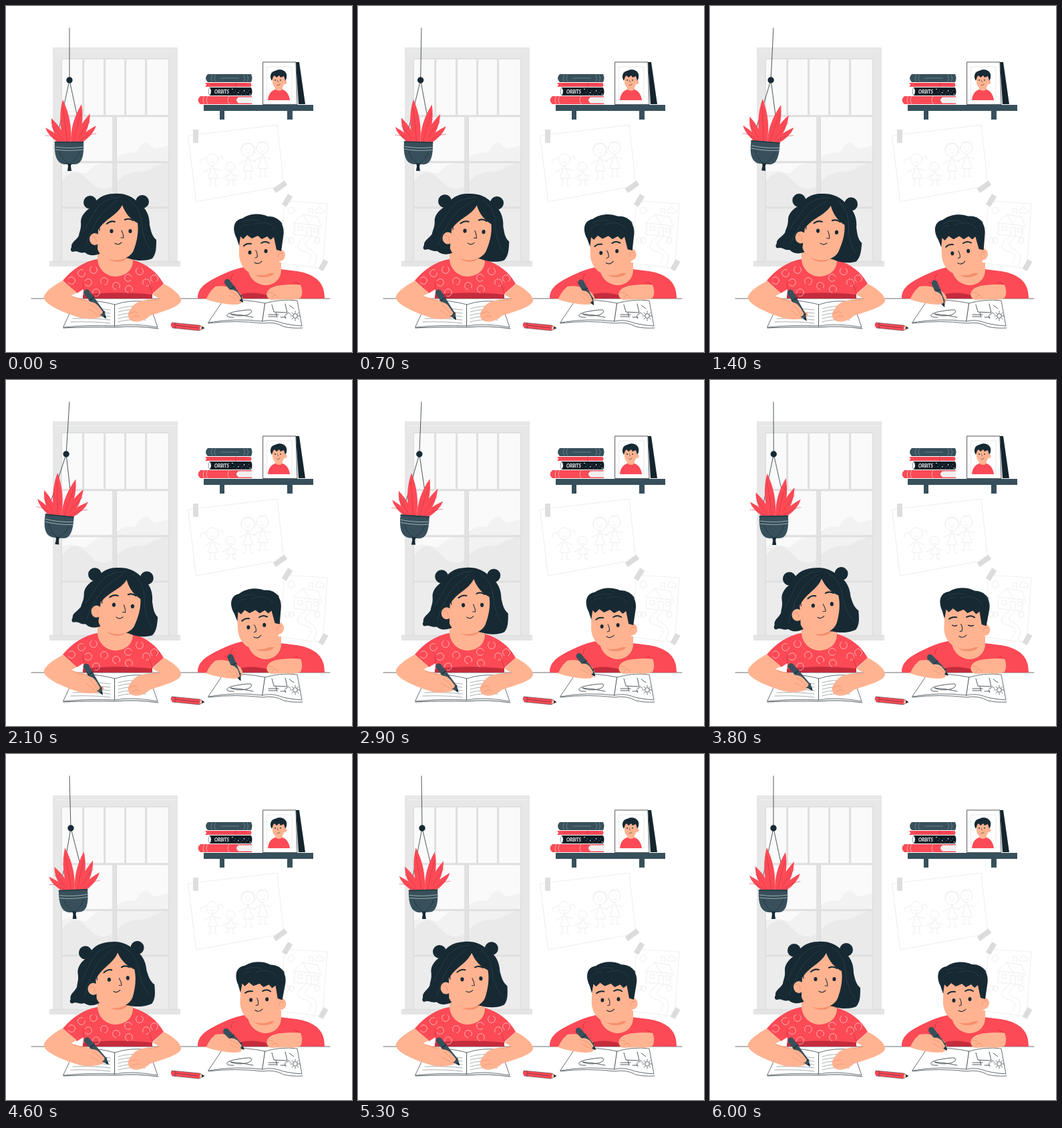
These frames come from a looping animation (518x518 px, 6100 ms). An HTML page with a canvas:

```html
<!DOCTYPE html>
<html lang="en">
<head>
<meta charset="utf-8">
<title>Children drawing</title>
<style>
html, body { margin: 0; width: 100%; height: 100%; overflow: hidden; background: #fff; }
canvas { display: block; width: 518px; height: 518px; }
</style>
</head>
<body>
<canvas id="stage"></canvas>
<script>
const SIZE = 518, LOOP = 6100, STEP = 100;
const RED = '#fc4a56', DEEP = '#c42c3d', SKIN = '#ffb391', SHADE = '#f58f6c';
const TEAL = '#37505b', DARK = '#172a34', INK = '#263238';
const canvas = document.getElementById('stage');
const ratio = window.devicePixelRatio || 1;
canvas.width = canvas.height = SIZE * ratio;
const ctx = canvas.getContext('2d');

function fill(d, color) {
  ctx.fillStyle = color;
  ctx.fill(new Path2D(d));
}

function line(d, color = INK, width = 0.8) {
  ctx.strokeStyle = color;
  ctx.lineWidth = width;
  ctx.stroke(new Path2D(d));
}

function shape(d, color, edge, width) {
  fill(d, color);
  line(d, edge, width);
}

function rect(x, y, w, h, color) {
  ctx.fillStyle = color;
  ctx.fillRect(x, y, w, h);
}

function oval(x, y, rx, ry, color) {
  ctx.beginPath();
  ctx.ellipse(x, y, rx, ry, 0, 0, Math.PI * 2);
  ctx.fillStyle = color;
  ctx.fill();
}

function ring(x, y, r, color, width = 0.8, from = 0, to = Math.PI * 2) {
  ctx.beginPath();
  ctx.arc(x, y, r, from, to);
  ctx.strokeStyle = color;
  ctx.lineWidth = width;
  ctx.stroke();
}

function turned(x, y, degrees, draw, dy = 0) {
  ctx.save();
  ctx.translate(x, y + dy);
  ctx.rotate(degrees * Math.PI / 180);
  ctx.translate(-x, -y);
  draw();
  ctx.restore();
}

// Cosine easing between [time, value] keys.
function track(keys, t) {
  let i = 1;
  while (i < keys.length - 1 && t > keys[i][0]) i++;
  const [t0, a] = keys[i - 1], [t1, b] = keys[i];
  const p = Math.min(1, Math.max(0, (t - t0) / (t1 - t0)));
  return a + (b - a) * (1 - Math.cos(Math.PI * p)) / 2;
}

const SWING = [[0, 0], [2000, 5], [4700, -2.1], [5900, 0], [6100, 0]];
const LEAN = [[0, 0], [1300, 1], [2000, 0.98], [3700, -1], [4700, -1], [6000, 0], [6100, 0]];

function drawWindow() {
  rect(70, 62, 187, 321, '#e7e7e7');
  rect(74, 68, 179, 1, '#efefef');
  rect(82, 78, 163, 304, '#e0e0e0');
  rect(84, 80, 159, 302, '#fafafa');
  fill('M84 249C94 246 104 246 114 250S128 238 140 236S154 232 166 226S178 219 188 220S198 207 207 205S216 215 228 213L243 208V302H84Z', '#f2f2f2');
  fill('M84 262C92 252 101 246 110 250S128 269 138 272S158 273 166 263S188 248 202 248S222 237 243 234V302H84Z', '#eaeaea');
  rect(84, 302, 159, 80, '#ececec');
  for (const x of [114, 146, 177, 208]) {
    rect(x, 80, 3, 84, '#e2e2e2');
    rect(x + 2.3, 80, 0.8, 84, '#d9d9d9');
  }
  rect(159, 166, 7, 136, '#e2e2e2');
  rect(165, 166, 1, 136, '#d9d9d9');
  for (const y of [163, 232, 300]) {
    rect(83, y, 161, 3, '#e2e2e2');
    rect(83, y + 2.4, 161, 0.8, '#dadada');
  }
  rect(65, 382, 196, 8, '#e4e4e4');
  rect(65, 382, 196, 1, '#dadada');
}

function drawPapers() {
  const faint = '#eaeaea';
  shape('M273 194L406 178L416 269L285 293Z', '#fff', '#e9e9e9');
  for (const [x, y, r, h] of [[309, 230, 9, 39], [336, 241, 7, 27], [362, 216, 10, 43], [384, 213, 9, 42]]) {
    ring(x, y, r, faint);
    oval(x - 3, y - 1, 0.7, 0.7, faint);
    oval(x + 3, y - 1, 0.7, 0.7, faint);
    ring(x, y + 2, 3, faint, 0.7, 0.2, 2.9);
    const neck = y + r, hip = y + h * 0.72, foot = y + h;
    line(`M${x} ${neck}L${x - 7} ${hip}H${x + 8}ZM${x - 3} ${hip}V${foot}h-4M${x + 4} ${hip}V${foot}h4M${x - 2} ${neck + 4}L${x - 13} ${neck + 10}M${x + 2} ${neck + 4}L${x + 12} ${neck + 7}`, faint);
  }
  line('M300 228q-12 0-9 8M318 227q6-6 7 3M352 216q1-15 15-10q9 5 5 15M378 206l3-4 3 3 4-3 4 5', faint);
  rect(280, 185, 8, 20, '#dedede');
  turned(410, 271, -36, () => rect(400, 267, 21, 8, '#dcdcdc'));

  shape('M417 292L481 296L474 393L411 385Z', '#fff', '#ebebeb');
  line('M429 326l15-14 23 4 6 17M433 325l-2 17 36 4 2-17M433 325l36 4M444 312l11 17M450 343v-12l7 1v13M438 330h6v6h-6ZM461 332h5v6h-5ZM454 311v-8h5v9', faint);
  line('M448 346C432 356 434 364 446 367S460 377 450 388M457 346C446 356 445 360 455 364S468 379 460 390', faint);
  ring(427, 306, 5, faint);
  for (const x of [421, 427, 466]) ring(x, 351, 4, faint);
  line('M466 304q3-6 6 0q6 1 4 6h-12q-3-5 2-6', faint);
  turned(421, 291, -58, () => rect(412, 287, 18, 8, '#dcdcdc'));
  turned(475, 388, -60, () => rect(467, 384, 16, 8, '#dcdcdc'));
}

function drawShelf() {
  rect(320, 156, 7, 14, TEAL);
  rect(421, 156, 8, 14, TEAL);
  rect(296, 148, 164, 9, TEAL);

  fill('M302 102H367Q370 108 367 114H302Q296 108 302 102Z', TEAL);
  line('M309 103q-4 5 0 10M314 103q-4 5 0 10M356 103q3 5 0 10M361 103q3 5 0 10M322 108H348', '#7d949c', 0.7);
  fill('M298 115H366Q369 118 366 121H298Q302 118 298 115Z', RED);
  line('M306 117H360M344 115v6', DEEP, 0.7);
  fill('M305 122H367Q370 128 367 134H305Q309 128 305 122Z', '#101c25');
  line('M305 122Q301 128 305 134', '#8d999d', 1);
  for (let i = 0; i < 13; i++) {
    const r = i % 4 ? 0.45 : 0.8;
    oval(339 + i * 2.2, 124.5 + (i * 5.3) % 8, r, r, '#fff');
  }
  ctx.fillStyle = '#fff';
  ctx.font = 'italic 700 6.6px Lato, sans-serif';
  ctx.fillText('ORBITS', 312, 130.6);
  fill('M291 135H368V147H291Q284 141 291 135Z', RED);
  fill('M348 136.5H369V145.5H348Q342 141 348 136.5Z', '#f3f3f3');
  line('M349 139H367M349 142H367', '#dedede', 0.6);
  line('M297 135q-4 6 0 12M302 135q-4 6 0 12M334 135q-4 6 0 12', '#ffb9b9', 0.8);

  fill('M434 84L439 84L448 147H438Z', '#14242d');
  shape('M385 84H434L436 147.5H385Z', '#fff', INK, 0.8);
  line('M391 91H428V141H391Z', '#e0e0e0', 0.7);
  fill('M392 141C393 130 398 127 403 125H414C420 127 424 133 425 141Z', RED);
  fill('M403 119H414V125Q409 129 403 125Z', SKIN);
  fill('M399 103H417V116Q415 123 408 124Q400 123 399 115Z', SKIN);
  oval(418, 114, 2.3, 3, SKIN);
  fill('M398 112C394 106 396 98 403 97C410 93 418 96 420 102Q421 108 418 112L416 105L411 107L409 104L405 107L402 104L400 106Z', DARK);
  oval(403, 111, 0.9, 1.1, INK);
  oval(411, 111, 0.9, 1.1, INK);
  line('M406.5 111l1 3M406 118q3 2 4-1', INK, 0.6);
}

function leaf(x, y, width) {
  const bx = 95 + (x - 95) * 0.34, mx = (bx + x) / 2, my = (204 + y) / 2;
  fill(`M${bx - 4} 205Q${mx - width} ${my} ${x} ${y}Q${mx + width} ${my} ${bx + 5} 205Z`, RED);
  line(`M${bx} 204Q${mx} ${my} ${x} ${y + 12}`, DEEP, 0.5);
}

function drawPot() {
  line('M95 111L75 204M95 111L115 204', INK, 0.8);
  oval(95, 111, 4.7, 4.7, DARK);
  for (const [x, y, w] of [[68, 168, 10], [126, 161, 10], [59, 182, 9], [135, 179, 10], [113, 147, 11], [85, 140, 12]]) leaf(x, y, w);
  fill('M73 203H116Q118 237 103 237H87Q71 235 73 203Z', TEAL);
  line('M73 204H116', DARK, 0.9);
  line('M74 211Q95 214 116 211M74 215Q95 218 116 215', '#c6d2d5', 0.7);
  line('M80 218Q84 230 95 237Q106 230 110 218', DARK, 0.6);
  fill('M92 236H98L97 240L98 247H92L93 240Z', DARK);
}

// The pot swings a little further than the cord that holds it.
function drawPlant(angle) {
  turned(95, 33, angle * 0.72, () => {
    line('M95 33V108', INK, 0.8);
    turned(95, 111, angle * 0.45, drawPot);
  });
}

function pen(tipX, tipY, angle, length) {
  ctx.save();
  ctx.translate(tipX, tipY);
  ctx.rotate(angle);
  fill(`M0 0L-9 -4H${5 - length}Q${-length - 2} 0 ${5 - length} 5L-9 4Z`, TEAL);
  line(`M-10 -4.5V4.5M${18 - length} -4.5V4.5`, DARK, 1);
  fill('M0 0L-5 -2.2V2.2Z', DARK);
  ctx.restore();
}

function drawGirlBook() {
  shape('M105 440Q138 440 163 447V479Q126 477 86 481Z', '#fff', INK, 0.7);
  shape('M163 447Q186 439 214 443L227 481Q188 474 163 479Z', '#fff', INK, 0.7);
  line('M86 482Q130 480 163 481Q194 478 228 483', INK, 0.8);
  for (let i = 0; i < 5; i++) {
    const y = 453 + i * 5;
    line(`M${109 - i * 3} ${y}Q134 ${y - 1} 156 ${y + 2}M168 ${y}Q184 ${y - 5} ${205 + i} ${y - 3}`, '#6d777c', 0.6);
  }
}

function drawGirlBody() {
  fill('M136 379C116 383 99 394 85 411L106 430L116 424L115 438H219V431L236 416C226 398 212 387 190 380Z', RED);
  fill('M115 433Q160 426 219 432V438H115Z', DEEP);
  fill('M137 360H190V381C190 396 178 405 163 405C148 404 138 393 137 379Z', SKIN);
  fill('M150 376H182Q178 383 166 383Q156 382 150 376Z', SHADE);
  for (const [x, y] of [[113, 400], [131, 395], [147, 412], [123, 414], [183, 407], [200, 397], [210, 414], [184, 424], [135, 429], [165, 419], [98, 411], [222, 408]]) {
    ring(x, y, 5.4, '#ffc0be', 0.9, x, x + 5.2);
  }
  line('M116 424L115 412M219 431L214 414', DEEP, 0.7);
}

function drawGirlArms(lean) {
  fill('M236 416C251 423 263 434 262 442C258 452 231 458 215 464C206 473 190 476 184 468Q180 461 187 453C192 445 201 440 211 440L230 438L219 432Z', SKIN);
  line('M185 461Q191 456 197 459M188 467Q194 462 200 465M211 440Q222 441 230 438', SHADE, 0.8);
  turned(57, 437, lean * 0.8, () => {
    fill('M85 411C67 421 55 431 57 438C60 448 88 460 112 467C128 470 144 467 147 462Q148 458 142 456L131 444Q124 439 116 439L97 434L106 429Z', SKIN);
    line('M97 434Q108 439 118 441', SHADE, 0.8);
  });
  turned(118, 424, lean > 0 ? lean * 7 : lean * 5, () => {
    pen(150, 468, Math.atan2(44, 32), 55);
    fill('M122 443Q132 441 139 450L145 458Q143 464 137 462L124 456Z', SKIN);
    line('M127 447Q134 450 140 459M124 454Q131 458 137 462', SHADE, 0.8);
  });
}

function drawGirlHead() {
  oval(126, 294, 10, 10, DARK);
  oval(204, 293, 10, 10, DARK);
  fill('M162 281C145 281 134 289 129 301C120 305 112 314 112 323C113 334 110 337 109 344C105 351 97 354 98 361Q95 367 100 368C107 365 110 371 118 369C126 376 136 373 142 370L184 378C199 383 212 381 219 378C225 371 225 362 225 350C218 344 217 336 215 328C215 314 210 303 200 296C188 284 177 280 162 281Z', DARK);
  fill('M174 298C166 314 150 317 138 335L137 364C144 385 182 386 191 366C196 353 199 338 197 325C186 319 179 311 174 298Z', SKIN);
  oval(133, 349, 8, 9, SKIN);
  line('M129 345Q136 345 135 353', SHADE, 0.9);
  line('M172 286Q144 288 134 306T116 337M168 291Q147 304 137 320T119 360M183 289Q202 302 203 325T217 366', '#33474f', 0.6);
  line('M174 296Q161 314 150 318T140 336', DARK, 1.2);
  line('M151 326Q157 321 163 323M178 320Q184 317 190 321', DARK, 2.1);
  oval(158, 337, 2.6, 3.1, DARK);
  oval(186, 337, 2.6, 3.1, DARK);
  line('M173 336Q176 342 176 347L172 347M163 355Q168 359 173 354', INK, 1.1);
}

function drawBoyBook() {
  shape('M326 440Q360 439 388 445L384 472Q344 467 303 474Z', '#fff', INK, 0.7);
  shape('M388 445Q412 438 436 441L443 479Q418 477 409 473Q396 469 384 472Z', '#fff', INK, 0.7);
  line('M303 475Q344 470 384 475Q402 472 416 480Q428 483 444 482', INK, 0.7);
  line('M341 466C326 467 327 460 346 457S370 454 367 459S345 466 336 461Q352 462 370 466', INK, 0.8);
  line('M398 447l3 11 20 1-3-13M404 459l2 7M393 462h15M393 465h12M411 466h8M424 448l7 5', INK, 0.8);
  ring(433, 464, 3.4, INK, 0.8);
  for (let i = 0; i < 8; i++) {
    const c = Math.cos(i * Math.PI / 4), s = Math.sin(i * Math.PI / 4);
    line(`M${433 + c * 5} ${464 + s * 5}L${433 + c * 7} ${464 + s * 7}`, INK, 0.7);
  }
  line('M419 468q-4-6 2-7q2-4 5 1', INK, 0.7);
}

function drawBoyBody() {
  fill('M356 391C338 394 306 409 295 419Q286 428 287 438H477C477 422 472 411 456 403C444 397 428 396 411 394Z', RED);
  fill('M342 434Q368 425 394 434V438H342Z', DEEP);
  line('M327 413Q338 418 347 430M431 413Q444 417 449 428M340 401Q336 405 337 410', DEEP, 0.8);
  fill('M362 384H412V396C411 410 401 418 387 418C373 416 364 407 362 394Z', SKIN);
  fill('M370 400H402Q397 406 385 406Q376 406 370 400Z', SHADE);
}

function drawBoyArms(lean) {
  fill('M447 418C426 416 402 417 394 424C387 431 391 439 398 440L416 439Q438 442 447 433Z', SKIN);
  fill('M440 415Q456 418 461 425L460 438H441Q446 427 440 415Z', RED);
  line('M393 429Q399 427 402 433M398 436Q405 429 408 438', SHADE, 0.8);
  fill('M302 423C317 417 333 418 345 426C356 432 357 443 350 446C338 449 313 444 296 438Z', SKIN);
  fill('M309 410L318 417Q306 424 300 438H287Q287 423 309 410Z', RED);
  turned(346, 430, lean > 0 ? lean * 15 : lean * 7, () => {
    pen(355, 444, Math.atan2(36, 27), 45);
    fill('M332 425Q341 423 347 429L352 437Q350 443 344 440L333 433Z', SKIN);
    line('M336 428Q344 430 349 438M334 433Q340 437 345 440', SHADE, 0.8);
  }, Math.max(0, lean) * 5);
}

function drawBoyHead(blink) {
  fill('M349 339H411V374C410 393 397 402 384 403C363 404 351 392 349 374Z', SKIN);
  oval(410, 373, 8, 9, SKIN);
  line('M407 376Q408 368 414 370', SHADE, 0.9);
  fill('M345 347C338 333 341 320 354 318C365 310 382 310 392 315C408 314 419 328 415 346L412 367L405 365L401 346L396 350L391 345L383 349L377 344L368 348L361 343L355 349L351 345L349 359Z', DARK);
  line('M404 319Q412 321 413 327M405 318Q407 323 413 325', DARK, 0.8);
  line('M354 324Q368 317 380 322M371 327Q393 319 404 334M351 332Q355 326 363 327', '#33474f', 0.6);
  line('M356 359Q360 355 367 356M382 355Q388 351 394 355', DARK, 2);
  if (blink) {
    line('M361 368Q364 370 368 368M385 367Q389 369 393 367', DARK, 1.4);
  } else {
    oval(365, 369, 2.5, 3, DARK);
    oval(389, 367, 2.5, 3, DARK);
  }
  line('M374 366Q377 371 376 376L373 377M372 384Q378 388 383 382', INK, 1.1);
}

function drawPencil() {
  fill('M248 474L290 478L297 482L289 486L249 482Q245 478 248 474Z', RED);
  fill('M291 479L297 482L290 485Z', '#ffd9be');
  fill('M293 480L297 482L293 484Z', DARK);
  line('M253 475V482M254 478L288 482M248 474L290 478L297 482L289 486L249 482', DARK, 0.5);
}

function draw(t) {
  const lean = track(LEAN, t);
  ctx.setTransform(ratio, 0, 0, ratio, 0, 0);
  ctx.lineCap = ctx.lineJoin = 'round';
  rect(0, 0, SIZE, SIZE, '#fff');
  drawWindow();
  drawPapers();
  drawShelf();
  drawPlant(track(SWING, t));
  line('M38 438H485', INK, 0.7);
  drawGirlBody();
  turned(165, 380, lean * 4.8, drawGirlHead);
  drawGirlBook();
  drawGirlArms(lean);
  drawBoyBody();
  turned(385, 405, lean * (lean > 0 ? -3.5 : -2.5), () => drawBoyHead(t >= 3700 && t <= 3900));
  drawBoyBook();
  drawBoyArms(lean);
  drawPencil();
}

function tick() {
  const t = performance.now() % LOOP;
  draw(Math.floor(t / STEP) * STEP);
  requestAnimationFrame(tick);
}
tick();
</script>
</body>
</html>
```
